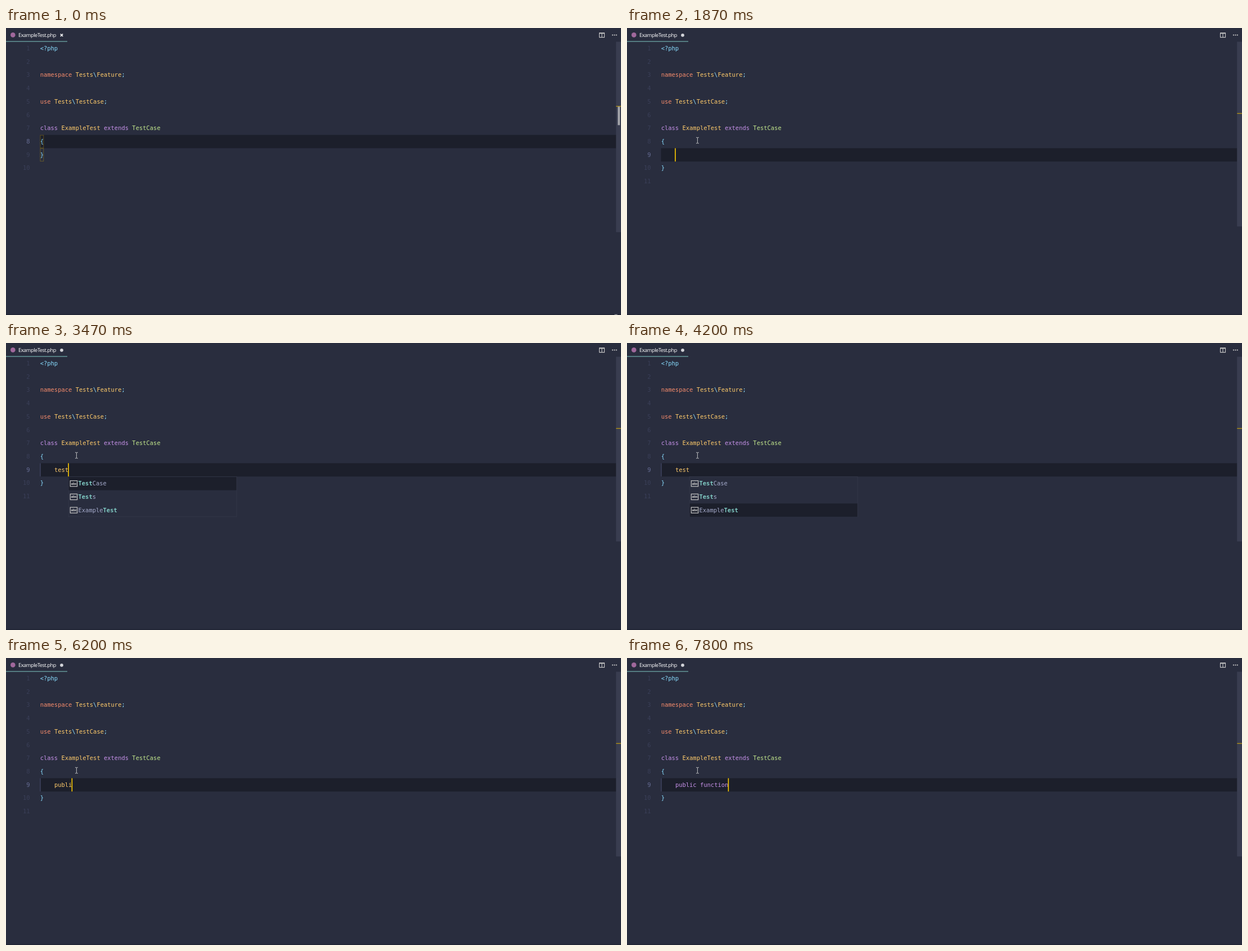
An HTML page for the animation above (8000 ms loop, 1094 px wide and 512 px high).

```html
<!DOCTYPE html>
<html lang="en">
<head>
<meta charset="utf-8">
<title>Code editor</title>
<style>
  html, body { margin: 0; width: 100%; height: 100%; overflow: hidden; background: #292d3e; }
  svg { display: block; width: 1094px; height: 512px; }
  text { white-space: pre; font: 10.464px "DejaVu Sans Mono", monospace; fill: #a6accd; }
  .tab { font: 9.3px "Open Sans", "Noto Sans", sans-serif; letter-spacing: -.48px; fill: #fff; }
  .num { text-anchor: end; fill: #3a3f58; }
  .num.on { fill: #676e95; }
  .kw { fill: #c792ea; }
  .cls { fill: #ffcb6b; }
  .base { fill: #c3e88d; }
  .op { fill: #89ddff; }
  .ns { fill: #f78c6c; }
  .hit { fill: #80cbc4; font-weight: bold; }
  .detail { text-anchor: end; fill: #7f849f; }
  .abc { font: bold 5.6px "DejaVu Sans", sans-serif; fill: #c5c5c5; letter-spacing: -.2px; }
  .info { font: bold 9.5px "DejaVu Serif", "Noto Serif", serif; text-anchor: middle; fill: #9fd0ee; }
  .line { fill: none; stroke: #c5c5c5; }
</style>
</head>
<body>
<svg viewBox="0 0 1094 512">
  <defs>
    <g id="wrench" class="line">
      <path d="M2.2 12 L8 6.2" stroke-width="3.3" stroke-linecap="round"/>
      <path d="M9.3 1.9 A2.8 2.8 0 1 0 12.2 4.8" stroke-width="2.8"/>
    </g>
    <g id="snippet" class="line" stroke-width="1.2">
      <path d="M1.6 11.4 V1.6 H12 V11.4"/>
      <path d="M1 12.6 H12.8" stroke-dasharray="1.6 1"/>
    </g>
    <g id="word">
      <rect class="line" x=".7" y="1.8" width="12.4" height="10.2" stroke-width="1.2"/>
      <text class="abc" x="1.9" y="8.8">abc</text>
    </g>
  </defs>
  <rect width="1094" height="512" fill="#292d3e"/>
  <rect y="510.3" width="1094" height="1.7" fill="#222636"/>

  <circle cx="12.3" cy="12.4" r="4.3" fill="#a0689c"/>
  <text class="tab" x="22" y="16.2">ExampleTest.php</text>
  <rect y="23.5" width="109" height="1" fill="#80cbc4"/>
  <g fill="none" stroke="#c5c5c5" stroke-width="1.1">
    <path d="M1055.5 9 H1064.5 V16.6 H1055.5 Z M1060 9 V16.6"/>
    <path d="M1055 9.3 H1065" stroke-width="1.8"/>
  </g>
  <g fill="#c5c5c5">
    <circle cx="1079" cy="12.6" r="1.15"/><circle cx="1082.4" cy="12.6" r="1.15"/><circle cx="1085.8" cy="12.6" r="1.15"/>
  </g>

  <g id="view"></g>
  <g id="mouse" fill="none" stroke="#d4d4d4" stroke-width=".9">
    <path d="M-2.4 -5.2 H-.6 L0 -4.6 L.6 -5.2 H2.4 M0 -4.6 V4.6 M-2.4 5.2 H-.6 L0 4.6 L.6 5.2 H2.4"/>
  </g>
</svg>
<script>
const LOOP = 8000, LEFT = 60.7, CH = 6.3, ROW = 23.73, TOP = 24.6;
const rowY = n => TOP + (n - 1) * ROW;
const colX = n => LEFT + n * CH;
const rect = (x, y, w, h, fill) => `<rect x="${x}" y="${y}" width="${w}" height="${h}" fill="${fill}"/>`;
const text = (x, y, s, cls = '') => `<text x="${x}" y="${y}" class="${cls}">${s}</text>`;
const span = (cls, s) => `<tspan class="${cls}">${s}</tspan>`;

const code = {
  1: span('op', '&lt;?php'),
  3: span('ns', 'namespace ') + span('cls', 'Tests') + span('op', '\\') + span('cls', 'Feature') + span('op', ';'),
  5: span('ns', 'use ') + span('cls', 'Tests') + span('op', '\\') + span('cls', 'TestCase') + span('op', ';'),
  7: span('kw', 'class ') + span('cls', 'ExampleTest ') + span('kw', 'extends ') + span('base', 'TestCase'),
  8: span('op', '{')
};

// A leading * marks a snippet entry
const lists = {
  t: 'table tbody td tem textarea tfoot th thead time title tr track',
  te: 'tem textarea',
  test: 'TestCase Tests ExampleTest',
  p: 'p param *param pic picture plaintext pre prog',
  f: 'fieldset fieldset:d fieldset:disabled fig figc figure font footer *for *foreach form form:get'
};

// start, typed text (null before Enter), caret, list, selected entry
const steps = [
  [0, null, 0], [735, null, 1], [1270, null, 0], [1800, null, 1],
  [1870, '', 1],
  [2070, 't', 1, 't', 0], [2200, 'te', 1, 't', 0], [2270, 'te', 1, 'te', 0],
  [2330, 'tes', 1, 'te', 0], [2400, 'test', 1, 'te', 0], [2470, 'test', 1, 'test', 0],
  [2930, 'test', 0, 'test', 0], [3470, 'test', 1, 'test', 0],
  [3930, 'test', 1, 'test', 1], [4000, 'test', 0, 'test', 1], [4200, 'test', 0, 'test', 2],
  [4470, 'test', 1], [4600, '', 1], [5070, '', 0],
  [5600, 'p', 1, 'p', 0], [5870, 'pu', 1], [6000, 'pub', 1], [6200, 'publi', 1],
  [6400, 'public', 1], [6530, 'public ', 1],
  [7000, 'public f', 1, 'f', 0], [7130, 'public fu', 1, 'f', 0], [7200, 'public fun', 1, 'f', 0],
  [7270, 'public func', 1], [7470, 'public funct', 1], [7530, 'public functi', 1],
  [7800, 'public function', 1]
];

function popup(x, key, sel) {
  const y = rowY(10) + .7, items = lists[key].split(' '), h = items.length * ROW;
  let out = `<rect x="${x}" y="${y - .4}" width="299" height="${h + .2}" fill="#292d3e" stroke="#343849" stroke-width=".9"/>`;
  items.forEach((item, i) => {
    const top = y + i * ROW, snippet = item[0] === '*', name = item.replace('*', '');
    const icon = key === 'test' ? 'word' : snippet ? 'snippet' : 'wrench';
    const at = name.toLowerCase().indexOf(key), end = at + key.length;
    if (i === sel) out += rect(x + .4, top, 298.2, ROW, '#1c1f2b');
    out += `<use href="#${icon}" x="${x + 2.4}" y="${top + 5}"/>`;
    out += text(x + 17.3, top + 15.4, name.slice(0, at) + span('hit', name.slice(at, end)) + name.slice(end));
    if (i === sel && icon === 'wrench') {
      out += text(x + 268.3, top + 15.4, 'Emmet Abbreviation', 'detail');
      out += `<circle cx="${x + 280.8}" cy="${top + 12.2}" r="7" fill="#2a6f9e"/>`;
      out += text(x + 280.8, top + 15.7, 'i', 'info');
    }
  });
  return out;
}

function draw([, typed, caret, key, sel]) {
  const edited = typed !== null, active = edited ? 9 : 8, last = edited ? 11 : 10;
  const col = edited ? 4 + typed.length : 1, y = rowY(active);
  let out = rect(60.5, y, 1025, ROW, '#1c1f2b');

  for (let n = 1; n <= last; n++) {
    out += text(42.6, rowY(n) + 15.3, n, n === active ? 'num on' : 'num');
    if (code[n]) out += text(LEFT, rowY(n) + 15.3, code[n]);
  }
  out += text(LEFT, rowY(last - 1) + 15.3, '}', 'op');

  if (edited) {
    out += '<circle cx="99" cy="12.8" r="2.9" fill="#d2d3d8"/>';
    if (typed) out += rect(60.5, y, 1, ROW, '#4e5579');
    const tinted = typed.replace(/\b(public|function)\b/g, w => span('kw', w));
    out += text(colX(4), y + 15.3, tinted, 'cls');
  } else {
    out += '<path d="M96.8 10.6 L101.2 15 M101.2 10.6 L96.8 15" stroke="#fff" stroke-width="1.5"/>';
    for (const n of [8, 9])
      out += `<rect x="61" y="${rowY(n) + .5}" width="5.8" height="${ROW - 1}" fill="none" stroke="#fc0" stroke-opacity=".31" stroke-width=".9"/>`;
  }

  out += rect(1085.2, 24.5, 8.8, edited ? 329.5 : 339.7, '#393d50');
  out += rect(1085.2, edited ? 151.8 : 139, 8.8, 1.3, '#b8960f');
  if (!edited) out += rect(1088.3, 140.3, 3.8, 33, '#a5a6ab');
  if (caret) out += rect(colX(col) - .8, y, 1.6, ROW, '#fc0');
  if (key) out += popup(colX(col) + .1, key, sel);
  return out;
}

const view = document.getElementById('view'), mouse = document.getElementById('mouse');
const start = performance.now();
let shown;

function frame() {
  const t = (performance.now() - start) % LOOP;
  const step = steps.findLast(s => s[0] <= t);
  if (step !== shown) view.innerHTML = draw(shown = step);

  // The pointer sweeps up past its goal, then settles
  const k = Math.min(1, Math.floor(t / 66.67) / 11), e = k * k * (3 - 2 * k);
  const x = 1085 - 959.6 * e, y = 516.4 - 315.9 * e - 630 * e ** 3 * (1 - e);
  mouse.setAttribute('transform', `translate(${x} ${y})`);
  requestAnimationFrame(frame);
}
frame();
</script>
</body>
</html>
```
